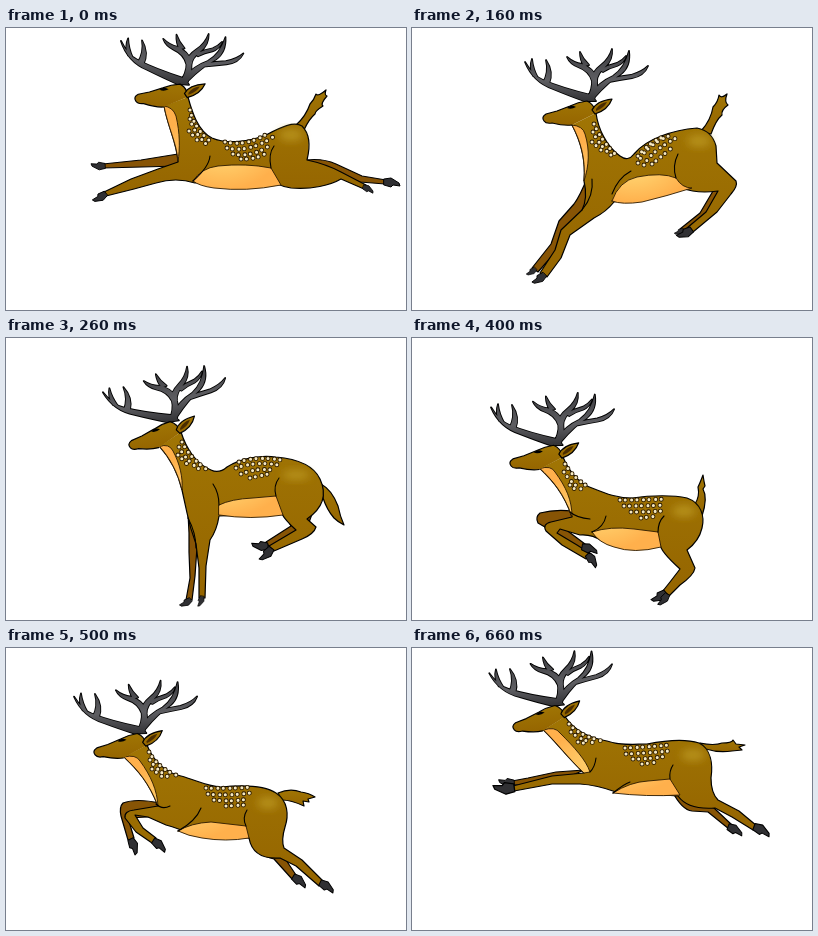
Animation of 400 by 282 pixels, one loop 0.7 s. Source, as an HTML page without scripts:

```html
<!DOCTYPE html>
<html lang="en">
<head>
<meta charset="utf-8">
<title>Leaping stag</title>
<style>
  html, body { margin: 0; width: 100%; height: 100%; overflow: hidden; background: #fff; }
  svg { display: block; width: 100vw; height: 100vh; }
  path { stroke-linejoin: round; stroke-linecap: round; }
  .pose { visibility: hidden; animation: show 700ms step-end calc(var(--i) * 100ms - 700ms) infinite; }
  @keyframes show {
    0% { visibility: visible; }
    14.2857%, 100% { visibility: hidden; }
  }
  .body { fill: url(#coat); stroke: #000; stroke-width: 1.2; }
  .far { fill: #875405; stroke: #000; stroke-width: 1.2; }
  .cream { fill: url(#belly); stroke: #2c1a00; stroke-width: .9; }
  .line { fill: none; stroke: #000; stroke-width: 1.1; }
  .glow { fill: #bd9a20; opacity: .8; filter: url(#soft); }
  .rim, .dot { fill: none; stroke: #2a1a00; stroke-width: 4.9; stroke-dasharray: 0 5.4 0 6.6; }
  .dot { stroke: #f6e8c0; stroke-width: 3.1; }
  .edge { fill: #000; stroke: #000; stroke-width: 1.8; }
  .horn { fill: url(#slate); }
</style>
</head>
<body>
<svg viewBox="0 0 400 282" preserveAspectRatio="none">
  <defs>
    <linearGradient id="coat" x1="0" y1="0" x2="0" y2="1">
      <stop offset="0" stop-color="#a07504"/>
      <stop offset="1" stop-color="#956500"/>
    </linearGradient>
    <radialGradient id="belly">
      <stop offset=".3" stop-color="#ffd06c"/>
      <stop offset="1" stop-color="#ffb04c"/>
    </radialGradient>
    <linearGradient id="slate" x1="0" y1="0" x2="0" y2="1">
      <stop offset="0" stop-color="#3c3c40"/>
      <stop offset=".6" stop-color="#5e5e62"/>
      <stop offset="1" stop-color="#333336"/>
    </linearGradient>
    <filter id="soft" x="-50%" y="-50%" width="200%" height="200%"><feGaussianBlur stdDeviation="4"/></filter>

    <path id="hoof" d="M-1-3 6-4 14 1 15 4 8 3 6 5-1 3Z" fill="#303033" stroke="#000"/>

    <path id="antlers" d="M172 73Q158 68 141 61Q121 54 113 34Q121 48 131 52Q150 60 179 67L184 73Z
      M121 48Q117 39 120 31Q121 41 126 50Z
      M131 55Q137 44 134 32Q142 44 137 56Z
      M174 72Q181 62 180 51Q180 44 189 37Q197 31 200 21Q201 32 193 39Q185 46 185 53Q186 62 182 72Z
      M180 53Q177 43 166 39Q158 36 155 29Q162 35 170 36Q181 40 185 50Z
      M172 38Q168 32 168 24Q171 31 177 37Z
      M178 67Q187 54 201 48Q213 40 217 23Q219 38 209 46Q196 54 183 69Z
      M197 51Q209 48 219 47Q230 44 236 38Q232 48 220 50Q207 52 197 54Z
      M188 42Q196 37 205 35Q211 32 214 28Q212 35 205 38Q197 40 191 44Z"/>

    <g id="head">
      <use href="#antlers" class="edge"/>
      <use href="#antlers" class="horn"/>
      <path class="body" d="M184 85Q182 76 175 73Q166 74 158 78L145 83 134 86Q129 89 132 93Q134 96 140 95Q152 98 160 97"/>
      <path class="body" d="M180 82Q184 73 200 71Q196 82 183 86Z"/>
      <path d="M184 81Q188 75 195 74Q192 80 184 83Z" fill="#4a2c00"/>
      <path d="M155 80Q159 76 164 79Q159 82 155 80Z"/>
    </g>

    <path id="s0" d="M184 82Q188 100 204 113M184 91Q187 103 200 116M183 103 192 113M219 114Q242 119 264 104M221 120Q242 125 267 109M227 126Q246 130 266 116M235 131Q250 132 262 124"/>
    <path id="s1" d="M182 96Q189 112 203 126M181 104Q187 117 200 128M180 114 190 123M226 135Q234 116 262 106M232 137Q240 122 268 108M226 128Q238 113 254 108M240 136Q250 128 262 118"/>
    <path id="s2" d="M176 104Q184 120 200 131M173 109Q180 123 196 133M172 117 182 127M233 124Q250 118 275 122M230 130Q250 123 272 127M235 136Q250 130 266 132M244 140 262 136"/>
    <path id="s3" d="M159 121Q168 138 183 148M156 125Q164 142 178 150M156 134 167 147M223 155Q245 151 268 153M223 161Q243 158 266 158M230 166Q245 163 260 163M240 170 254 168"/>
    <path id="s4" d="M153 126Q161 140 178 150M152 134Q160 147 173 153M158 147 164 152M208 162Q230 162 254 161M212 168Q232 168 252 167M219 174Q235 174 250 173M229 180 246 178"/>
    <path id="s5" d="M143 104Q152 120 170 127M144 112Q152 124 166 131M146 121 158 130M200 140Q222 141 246 139M202 146Q222 148 244 145M208 152Q226 154 242 151M220 158 238 157"/>
    <path id="s6" d="M157 76Q168 88 190 93M159 84Q168 92 183 95M166 94 176 96M213 100Q236 99 258 97M214 106Q236 105 257 103M221 111Q240 111 254 108M230 116 246 114"/>
  </defs>

  <g class="pose" style="--i:0">
    <path class="body" d="M290 97Q300 88 304 76Q308 72 310 66Q312 69 320 62Q318 67 321 68Q314 76 317 78Q309 83 309 86Q303 91 298 102Z"/>
    <path class="far" d="M300 132Q317 130 330 136L356 148 380 152 379 156 354 154 325 144 300 148ZM172 126 135 132 97 136 97 140 136 139 172 138Z"/>
    <path class="body" d="M182 69C186 84 192 103 206 110C222 117 244 113 260 107C275 99 288 93 296 98C304 106 304 120 301 132Q320 136 335 144L360 157 358 161 335 151C325 157 305 162 285 160Q268 157 263 150L189 155Q170 149 150 155L128 161 100 168 98 164 125 151 152 141 172 134C171 115 162 100 158 78"/>
    <path class="cream" d="M158 78Q167 79 170 88C174 105 174 120 172 134C171 115 162 100 158 78ZM187 153Q195 140 212 138Q240 135 265 140L275 157Q240 164 208 160Q193 158 187 153Z"/>
    <path class="line" d="M265 140Q262 126 268 118M187 153Q203 139 204 128"/>
    <ellipse class="glow" cx="285" cy="107" rx="12" ry="6"/>
    <use href="#s0" class="rim"/><use href="#s0" class="dot"/>
    <use href="#hoof" transform="translate(379 154)"/>
    <use href="#hoof" transform="translate(358 159) rotate(20) scale(.7)"/>
    <use href="#hoof" transform="translate(98 138) rotate(175) scale(.85)"/>
    <use href="#hoof" transform="translate(99 166) rotate(140) scale(.9)"/>
    <use href="#head" transform="translate(-2 -20) rotate(4 131 90)"/>
  </g>

  <g class="pose" style="--i:1">
    <path class="body" d="M289 103Q299 92 301 79Q306 74 307 67Q309 71 315 66Q312 74 316 77Q309 82 310 87Q304 92 299 106Z"/>
    <path class="far" d="M176 148Q168 168 162 176L147 193 139 216 120 240 126 244 147 220 160 200 185 184ZM282 160 301 163 288 185 268 201 275 205 296 189 313 160Z"/>
    <path class="body" d="M184 85C186 100 194 118 208 128Q216 134 222 126C235 110 262 102 285 100Q300 103 304 118L305 135 324 153Q326 158 319 166L305 184 281 204 275 200 294 184 306 163Q285 166 270 160L202 174Q194 184 182 190L158 207 149 230 135 249 128 245 143 222 149 202 170 182Q176 170 172 153C174 130 168 112 160 97"/>
    <path class="cream" d="M160 97Q171 98 173 106C178 122 177 138 172 153C174 130 168 112 160 97ZM200 173Q207 153 225 149Q250 144 264 150Q270 160 280 160Q255 168 230 174Q210 177 200 173Z"/>
    <path class="line" d="M264 150Q260 138 266 126M200 166Q206 150 219 143M180 151Q182 168 170 182"/>
    <ellipse class="glow" cx="287" cy="113" rx="12" ry="6"/>
    <use href="#s1" class="rim"/><use href="#s1" class="dot"/>
    <use href="#hoof" transform="translate(271 202) rotate(145) scale(.6)"/>
    <use href="#hoof" transform="translate(279 202) rotate(145)"/>
    <use href="#hoof" transform="translate(123 241) rotate(135) scale(.65)"/>
    <use href="#hoof" transform="translate(132 247) rotate(135) scale(.9)"/>
    <use href="#head"/>
  </g>

  <g class="pose" style="--i:2">
    <path class="body" d="M315 146Q326 152 332 168Q334 178 338 187Q332 184 328 180Q321 172 317 160Z"/>
    <path class="far" d="M272 165 285 188 260 204 265 211 300 193 306 176ZM182 175 183 195 183 214 184 240 180 262 186 262 189 238 192 195Z"/>
    <path class="body" d="M175 94C180 110 190 126 205 132Q213 136 221 129C235 120 255 117 270 119C292 121 308 128 314 141C321 156 317 170 301 181L310 189Q308 196 296 201L268 213 263 208 290 192Q279 182 276 176L213 178Q211 192 204 202L200 228 199 260 193 260 193 230 190 206Q184 190 181 175L176 152C172 135 164 120 153.6 108.5"/>
    <path class="cream" d="M153.6 108.5Q163 105 167 113C174 126 177 140 176 152C172 135 164 120 153.6 108.5ZM213 167Q225 161 247 160L270 158 277 177Q245 182 213 177Z"/>
    <path class="line" d="M270 158Q267 148 273 140M213 167Q213 155 207 146M182 180Q190 195 190 210"/>
    <ellipse class="glow" cx="290" cy="137" rx="14" ry="5"/>
    <use href="#s2" class="rim"/><use href="#s2" class="dot"/>
    <use href="#hoof" transform="translate(261 208) rotate(175)"/>
    <use href="#hoof" transform="translate(265 211) rotate(125)"/>
    <use href="#hoof" transform="translate(184 262) rotate(140) scale(.75)"/>
    <use href="#hoof" transform="translate(196 259) rotate(100) scale(.65)"/>
    <use href="#head" transform="translate(-8 17) rotate(-8.5 131 90)"/>
  </g>

  <g class="pose" style="--i:3">
    <path class="body" d="M302 170Q312 165 320 167Q332 163 343 153Q341 163 333 168L337 173Q326 173 330 178Q316 180 303 176Z"/>
    <path class="far" d="M257 200 267 222 261 236 240 249 245 254 270 242 280 215Z"/>
    <path class="body" d="M160 113C165 130 172 144 184 148C196 153 210 150 222 151C240 149 262 149 275 153C294 157 304 168 304 182C304 200 296 212 284 219Q288 230 272 241L247 256 243 250 264 237 273 224Q257 214 257 202L198 203Q196 216 203 229L212 242 223 255 217 259 195 237 181 213Q166 199 162 180C158 160 150 142 138.6 127.5"/>
    <path class="cream" d="M138.6 127.5Q149 123 153 132C160 147 163 164 162 180C158 160 150 142 138.6 127.5ZM197 191Q210 188 230 190L258 188 258 202Q230 209 197 203Z"/>
    <path class="line" d="M258 188Q257 182 262 177M197 191Q195 180 198 174M164 183Q172 199 184 215"/>
    <ellipse class="glow" cx="281" cy="167" rx="13" ry="6"/>
    <use href="#s3" class="rim"/><use href="#s3" class="dot"/>
    <use href="#hoof" transform="translate(244 250) rotate(140) scale(.9)"/>
    <use href="#hoof" transform="translate(244 252) rotate(150) scale(.8)"/>
    <use href="#hoof" transform="translate(219 256) rotate(35) scale(.95)"/>
    <use href="#hoof" transform="translate(217 257) rotate(60) scale(.7)"/>
    <use href="#head" transform="translate(-23 36) rotate(-8.5 131 90)"/>
  </g>

  <g class="pose" style="--i:4">
    <path class="body" d="M283 166Q288 158 286 149Q288 145 291 137Q292 144 293 148L291 151Q296 160 290 178Z"/>
    <path class="far" d="M160 173Q143 171 128 175Q123 179 126 185L150 199 169 211 173 206 153 191 141 184 175 190Z"/>
    <path class="body" d="M151 119C157 134 168 146 180 150C195 156 205 160 220 160C240 157 262 157 275 160C289 165 293 178 290 190Q287 203 275 212L283 230Q282 237 268 247L257 258 250 254 258 244 268 231Q248 213 248 206L190 203Q180 196 168 197L148 191 145 195 165 207 179 216 174 221 150 207 134 193Q130 186 139 184L160 179C152 155 140 142 128 130.5"/>
    <path class="cream" d="M128 130.5Q139 127 143 134C154 149 160 162 160 179C152 155 140 142 128 130.5ZM180 194Q198 188 222 191L246 194 249 209Q222 216 202 209Q187 205 180 194Z"/>
    <path class="line" d="M246 194Q246 184 252 178M180 194Q192 189 194 178M158 174Q165 180 178 181"/>
    <ellipse class="glow" cx="272" cy="173" rx="12" ry="6"/>
    <use href="#s4" class="rim"/><use href="#s4" class="dot"/>
    <use href="#hoof" transform="translate(253 255) rotate(140)"/>
    <use href="#hoof" transform="translate(255 257) rotate(120) scale(.85)"/>
    <use href="#hoof" transform="translate(171 209) rotate(10)"/>
    <use href="#hoof" transform="translate(176 217) rotate(45) scale(.95)"/>
    <use href="#head" transform="translate(-33 35) rotate(-1 131 90)"/>
  </g>

  <g class="pose" style="--i:5">
    <path class="body" d="M272 145Q284 140 295 144Q303 145 309 149L302 151 303 154 297 153 298 158Q285 152 276 152Z"/>
    <path class="far" d="M154 155Q130 150 117 155Q113 159 115 168L122 192 128 190 122 170 160 168ZM242 188Q250 207 268 211L286 231 290 227 276 206 270 190Z"/>
    <path class="body" d="M141 97C147 113 160 125 175 128C190 132 200 138 215 139C235 137 258 137 270 145C282 153 283 167 279 179Q275 192 278 200L296 212 317 233 313 238 290 218 274 210Q247 212 243 190L186 187Q172 180 160 177L142 169 129 167 137 180 150 190 146 195 130 184 119 170Q118 163 128 162L152 158C143 135 132 122 118 109"/>
    <path class="cream" d="M118 109Q130 106 134 113C145 128 151 142 152 158C143 135 132 122 118 109ZM172 183Q185 175 205 174L240 178 243 190Q220 194 196 190Q182 188 172 183Z"/>
    <path class="line" d="M240 178Q236 170 241 162M172 183Q190 173 195 160M150 156Q156 162 164 158"/>
    <ellipse class="glow" cx="262" cy="155" rx="11" ry="6"/>
    <use href="#s5" class="rim"/><use href="#s5" class="dot"/>
    <use href="#hoof" transform="translate(315 235) rotate(25)"/>
    <use href="#hoof" transform="translate(288 229) rotate(30)"/>
    <use href="#hoof" transform="translate(125 192) rotate(60)"/>
    <use href="#hoof" transform="translate(148 193) rotate(32)"/>
    <use href="#head" transform="translate(-43 14) rotate(-2 131 90)"/>
  </g>

  <g class="pose" style="--i:6">
    <path class="body" d="M288 95Q302 98 310 95Q320 95 321 92L324 96 333 97 327 99 330 102 320 103Q306 105 294 101Z"/>
    <path class="far" d="M172 122 144 124 116 130 100 133 101 137 143 135ZM260 143Q270 162 280 163L296 164 317 181 320 177 302 160 292 146Z"/>
    <path class="body" d="M153 68.5C162 82 178 90 195 93C210 98 222 96 235 96C255 92 275 91 287 95C299 101 301 116 299 130Q299 145 306 152L327 163 345 178 341 182 320 169 303 160Q276 162 266 148L204 144Q185 137 168 136L140 136 102 143 101 138 140 128 172 125C156 110 145 95 131.5 82"/>
    <path class="cream" d="M131.5 82Q143 78 148 85C162 99 174 112 178 124L172 125C156 110 145 95 131.5 82ZM201 145Q218 134 236 133L258 131 268 147Q235 149 201 145Z"/>
    <path class="line" d="M258 131Q257 123 261 117M178 124Q183 119 184 110M201 145Q212 136 218 134"/>
    <ellipse class="glow" cx="281" cy="107" rx="12" ry="6"/>
    <use href="#s6" class="rim"/><use href="#s6" class="dot"/>
    <use href="#hoof" transform="translate(343 179) rotate(20) scale(1.1)"/>
    <use href="#hoof" transform="translate(317 179) rotate(20)"/>
    <use href="#hoof" transform="translate(101 135) rotate(178) scale(.95)"/>
    <use href="#hoof" transform="translate(101 140) rotate(172) scale(1.3)"/>
    <use href="#head" transform="translate(-30 -11) rotate(-6 131 90)"/>
  </g>
</svg>
</body>
</html>
```
